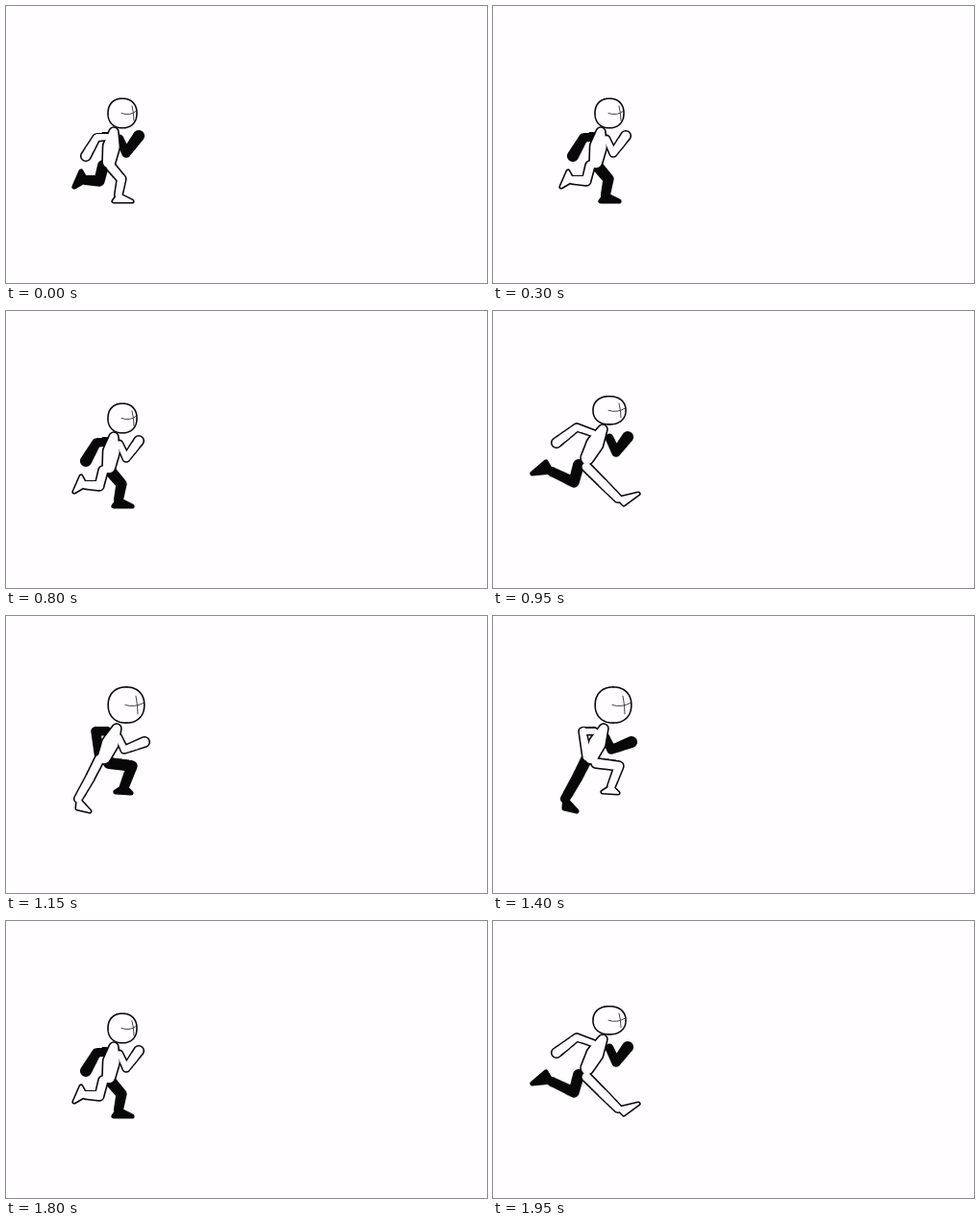
Write an HTML page with a canvas that moves like this. It is 500 px wide and 288 px high and loops after 2 s.

```html
<!DOCTYPE html>
<html lang="en">
<head>
<meta charset="utf-8">
<title>Run cycle</title>
<style>
  html, body { margin: 0; width: 100%; height: 100%; overflow: hidden; background: #fffdff; }
  canvas { display: block; }
</style>
</head>
<body>
<canvas id="stage" width="500" height="288"></canvas>
<script>
const ctx = document.getElementById('stage').getContext('2d');
const PAPER = '#fffdff', INK = '#080808', HALF_LINE = 0.8;

// Radii along each part: shoulder-elbow-hand, hip-knee-ankle, chest-waist-hip.
const ARM = [3.6, 4, 5.3], LEG = [5.2, 4.9, 4.3], TORSO = [5, 9, 7], FOOT = 1.8;

// Joints. Legs run hip, knee, ankle, heel, toe; the head is centre, then radii.
const down = {
  head: [[121, 111.5], [15, 15.3]],
  torso: [[112, 131], [107, 162]],
  rearArm: [[106, 136], [94, 137], [83, 156]],
  frontArm: [[118, 138], [125, 153], [138, 135]],
  rearLeg: [[101, 166], [97, 182], [83, 181], [78, 172], [71, 188]],
  frontLeg: [[109, 167], [120, 180], [117, 196], [112, 203], [131, 203]]
};
const push = {
  head: [[125, 92.5], [18.8, 18.6]],
  torso: [[115, 117], [102, 147]],
  rearArm: [[106, 120], [93, 120], [98, 146]],
  frontArm: [[117, 126], [123, 139], [144, 131]],
  rearLeg: [[97, 149], [87, 169], [75, 190], [74, 200], [87, 203]],
  frontLeg: [[107, 153], [131, 156], [123, 177], [114, 183], [130, 184]]
};
const contact = {
  head: [[121, 103.3], [17, 14.6]],
  torso: [[114, 123], [98, 153]],
  rearArm: [[104, 127], [87, 121], [66, 137]],
  frontArm: [[121, 132], [128, 147], [140, 131]],
  rearLeg: [[89, 160], [84, 178], [61, 167], [55, 157], [41, 169]],
  frontLeg: [[97, 162], [115, 180], [130, 195], [136, 201], [151, 190]]
};

const mid = (a, b) => Array.isArray(a) ? a.map((v, i) => mid(v, b[i])) : (a + b) / 2;
const air = {};
for (const part in push) air[part] = mid(push[part], contact[part]);

// Tapered tube: circles set closely along the joints.
function tube(points, radii, grow) {
  ctx.beginPath();
  for (let i = 0; i < radii.length - 1; i++) {
    const [[x, y], [u, v]] = points.slice(i, i + 2);
    for (let k = 0; k <= 1; k += 1 / 64) {
      const cx = x + (u - x) * k, cy = y + (v - y) * k;
      const r = radii[i] + (radii[i + 1] - radii[i]) * k + grow;
      ctx.moveTo(cx + r, cy);
      ctx.arc(cx, cy, r, 0, 7);
    }
  }
  ctx.fill();
}

function foot(points, grow) {
  ctx.beginPath();
  points.forEach(p => ctx.lineTo(...p));
  ctx.closePath();
  ctx.lineWidth = 2 * (FOOT + grow);
  ctx.fill();
  ctx.stroke();
}

function limb(pose, name, grow) {
  const points = pose[name], isLeg = name.endsWith('Leg');
  tube(points, isLeg ? LEG : ARM, grow);
  if (isLeg) foot(points.slice(2), grow);
}

// Slightly squared circle with a curved cross for the face.
function drawHead([[x, y], [rx, ry]]) {
  const bulge = v => Math.sign(v) * Math.abs(v) ** 0.9;
  ctx.beginPath();
  for (let a = 0; a < 6.28; a += 0.05) {
    ctx.lineTo(x + rx * bulge(Math.cos(a)), y + ry * bulge(Math.sin(a)));
  }
  ctx.closePath();
  ctx.fillStyle = PAPER;
  ctx.fill();
  ctx.strokeStyle = INK;
  ctx.lineWidth = 2 * HALF_LINE;
  ctx.stroke();

  ctx.beginPath();
  ctx.moveTo(x - 1, y);
  ctx.quadraticCurveTo(x + 8, y + 3, x + rx - 1, y - 2);
  ctx.moveTo(x + 10, y - ry / 2);
  ctx.quadraticCurveTo(x + 12, y, x + 12, y + ry / 2);
  ctx.strokeStyle = '#444';
  ctx.lineWidth = 1;
  ctx.stroke();
}

function drawRunner(pose, side) {
  const pairs = [['rearLeg', 'frontArm'], ['frontLeg', 'rearArm']];
  const [chest, hip] = pose.torso;
  const torso = [chest, mid(chest, hip), hip];
  const setColour = c => ctx.fillStyle = ctx.strokeStyle = c;

  setColour(INK);
  pairs[side].forEach(name => limb(pose, name, HALF_LINE));
  // Near parts share one outline: all ink first, then all paper.
  for (const [colour, grow] of [[INK, HALF_LINE], [PAPER, -HALF_LINE]]) {
    setColour(colour);
    tube(torso, TORSO, grow);
    pairs[1 - side].forEach(name => limb(pose, name, grow));
  }
  drawHead(pose.head);
}

ctx.lineCap = ctx.lineJoin = 'round';
const start = performance.now();

function tick() {
  const n = Math.floor(Math.max(0, performance.now() - start) / 50) % 40;
  const step = Math.floor(n / 5), phase = n % 5;
  const leap = step > 1 && step % 2 ? contact : air;
  const pose = [down, down, push, push, leap][phase];
  ctx.fillStyle = PAPER;
  ctx.fillRect(0, 0, 500, 288);
  drawRunner(pose, (step + (phase > 1)) % 2);
  requestAnimationFrame(tick);
}
tick();
</script>
</body>
</html>
```
